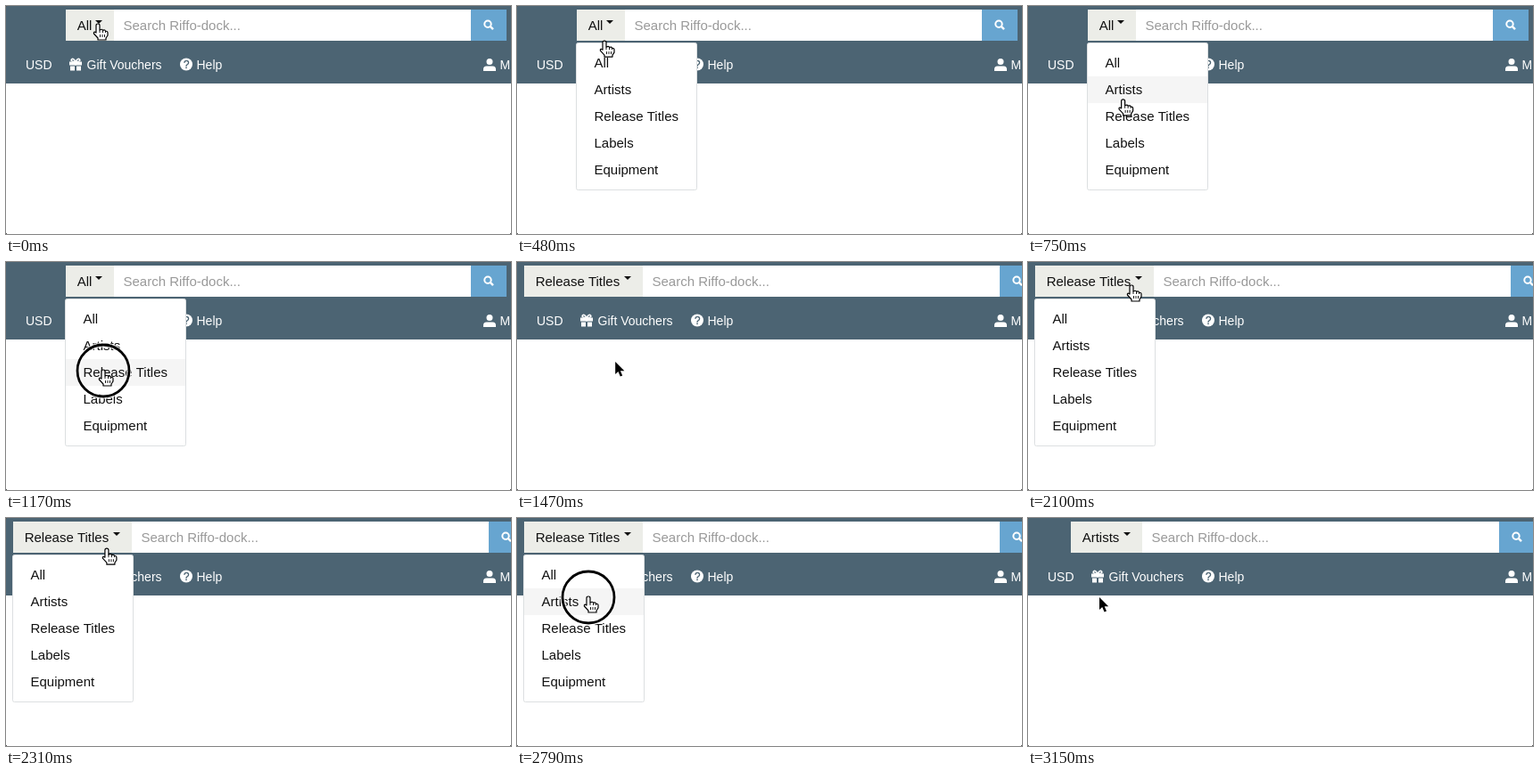
Recreate the animation shown at these times as an HTML page with a canvas. Size 566 by 256 pixels, loop 3.3 s.

```html
<!DOCTYPE html>
<html lang="en">
<head>
<meta charset="utf-8">
<title>Search category menu</title>
<style>
  html, body { margin: 0; width: 100%; height: 100%; overflow: hidden; background: #fff; }
  canvas { display: block; }
</style>
</head>
<body>
<canvas id="stage" width="566" height="256"></canvas>
<script>
const ctx = document.getElementById('stage').getContext('2d');
const LOOP = 3300;
const NAVY = '#4c6473';
const ITEMS = ['All', 'Artists', 'Release Titles', 'Labels', 'Equipment'];

// Category button: label, left edge, right edge, time until which it shows
const BUTTONS = [
  { label: 'All', left: 67, right: 121, until: 1320 },
  { label: 'Release Titles', left: 8, right: 141, until: 2850 },
  { label: 'Artists', left: 48, right: 128, until: LOOP }
];
const OPEN = [[180, 1320], [2100, 2850]];
const PRESS = [[30, 180], [1170, 1320], [1950, 2100], [2700, 2850]];

// Pointer path: time, x, y
const PATH = [
  [0, 103, 21], [270, 103, 21], [480, 98, 40], [540, 99, 50], [870, 109, 122],
  [1410, 109, 122], [1680, 118, 38], [1800, 117, 31], [1890, 116, 27],
  [2250, 116, 27], [2310, 113, 35], [2430, 80, 89], [LOOP, 80, 89]
];

const HAND = new Path2D('M-2 9V1Q-2-1 0-1Q2-1 2 1V6Q5 4.3 5.5 6.4Q8 5.2 8.5 7.3Q11 7 11 9.3V12L9 15V17H0V15L-4.6 10Q-5 7-2 9Z');
const KNUCKLES = new Path2D('M2 6V9M5.5 6.5V9M8.5 7.5V9M2.5 11V14M5 11V14M7.5 11V14');
const ARROW = new Path2D('M0 0V14L3.2 11L5.6 16.5L8 15.5L5.7 10.2H10.2Z');
const GIFT = new Path2D('M0 4H14V8H0ZM1 9H6V14H1ZM8 9H13V14H8Z');
const BOW = new Path2D('M7 4Q1 4 2.5 1.5Q4.5-.5 7 4Q9.5-.5 11.5 1.5Q13 4 7 4');
const USER = new Path2D('M0 14V12Q0 8.5 3.5 8.5H10.5Q14 8.5 14 12V14ZM10.5 3.5A3.5 3.5 0 1 1 3.5 3.5A3.5 3.5 0 1 1 10.5 3.5Z');

const within = (ranges, t) => ranges.some(([from, to]) => t >= from && t < to);

function box(x, y, w, h, color) {
  ctx.fillStyle = color;
  ctx.fillRect(x, y, w, h);
}

function text(string, x, y, size, color) {
  ctx.font = `${size}px "Liberation Sans", Arial, sans-serif`;
  ctx.fillStyle = color;
  ctx.fillText(string, x, y);
}

function at(x, y, draw) {
  ctx.save();
  ctx.translate(x, y);
  draw();
  ctx.restore();
}

function circle(x, y, r) {
  ctx.beginPath();
  ctx.arc(x, y, r, 0, Math.PI * 2);
}

function stroke(color, width, path) {
  ctx.strokeStyle = color;
  ctx.lineWidth = width;
  path ? ctx.stroke(path) : ctx.stroke();
}

// Monotone cubic interpolation along one axis
function follow(t, axis) {
  let i = 0;
  while (i < PATH.length - 2 && t >= PATH[i + 1][0]) i++;
  const rate = k => PATH[k] && PATH[k + 1]
    ? (PATH[k + 1][axis] - PATH[k][axis]) / (PATH[k + 1][0] - PATH[k][0]) : 0;
  const slope = k => {
    const a = rate(k - 1), b = rate(k);
    return a * b > 0 ? 2 * a * b / (a + b) : 0;
  };
  const [p, q] = [PATH[i], PATH[i + 1]];
  const span = q[0] - p[0], u = (t - p[0]) / span, v = 1 - u;
  return v * v * (1 + 2 * u) * p[axis] + u * u * (3 - 2 * u) * q[axis]
    + span * u * v * (v * slope(i) - u * slope(i + 1));
}

function drawNav() {
  box(0, 0, 566, 87, NAVY);
  text('USD', 22, 71, 14, '#fff');
  text('Gift Vouchers', 90.5, 71, 14, '#fff');
  text('Help', 213.5, 71, 14, '#fff');
  text('M', 553.5, 71, 14, '#fff');
  at(71, 58.5, () => {
    ctx.fillStyle = '#fff';
    ctx.fill(GIFT);
    stroke('#fff', 1.6, BOW);
    box(6, 4, 2, 4, '#fff');
  });
  circle(202, 65.5, 7);
  ctx.fillStyle = '#fff';
  ctx.fill();
  ctx.textAlign = 'center';
  text('?', 202, 70, 12, NAVY);
  text('?', 202.4, 70, 12, NAVY);
  ctx.textAlign = 'left';
  at(535, 59, () => { ctx.fillStyle = '#fff'; ctx.fill(USER); });
}

function drawSearch({ label, left, right }) {
  box(left, 4, right - left, 35, '#ecede8');
  text(label, left + 12.7, 27, 15, '#111');
  ctx.beginPath();
  ctx.moveTo(right - 21, 16);
  ctx.lineTo(right - 13, 16);
  ctx.lineTo(right - 17, 20);
  ctx.fill();
  box(right, 4, 400, 35, '#fff');
  text('Search Riffo-dock...', right + 10.5, 27, 15, '#999');
  box(right + 400, 4, 40, 35, '#67a5d0');
  circle(right + 419, 20.2, 3.7);
  stroke('#fff', 2);
  ctx.beginPath();
  ctx.moveTo(right + 421.7, 22.9);
  ctx.lineTo(right + 425, 26.2);
  stroke('#fff', 2.4);
}

function drawMenu(left, y) {
  ctx.beginPath();
  ctx.roundRect(left - 0.5, 41.5, 135, 165, 2);
  ctx.fillStyle = '#fff';
  ctx.fill();
  stroke('#dcdfe1', 1);
  ITEMS.forEach((item, i) => {
    const top = 49 + 30 * i;
    if (y >= top && y < top + 30) box(left, top, 134, 30, '#f5f5f5');
    text(item, left + 19.5, top + 20, 15, '#111');
  });
}

function drawPointer(x, y, hand) {
  at(x, y, () => {
    ctx.lineJoin = 'round';
    if (hand) {
      ctx.fillStyle = '#fff';
      ctx.fill(HAND);
      stroke('#000', 1.2, HAND);
      stroke('#000', 0.9, KNUCKLES);
    } else {
      stroke('#fff', 2.4, ARROW);
      ctx.fillStyle = '#000';
      ctx.fill(ARROW);
    }
  });
}

function drawCorners() {
  for (const x of [0, 565]) for (const y of [0, 255]) box(x, y, 1, 1, '#555');
}

function frame(now) {
  const t = now % LOOP;
  const x = follow(t, 1), y = follow(t, 2);
  const button = BUTTONS.find(b => t < b.until);
  const open = within(OPEN, t);
  box(0, 0, 566, 256, '#fff');
  drawNav();
  drawSearch(button);
  if (open) drawMenu(button.left, y);
  drawPointer(x, y, open || y < 40 || (y > 57 && y < 75));
  if (within(PRESS, t)) {
    circle(x, y, 29);
    stroke('rgba(255,255,255,.7)', 5.5);
    stroke('#000', 2.8);
  }
  drawCorners();
  requestAnimationFrame(frame);
}
requestAnimationFrame(frame);
</script>
</body>
</html>
```
